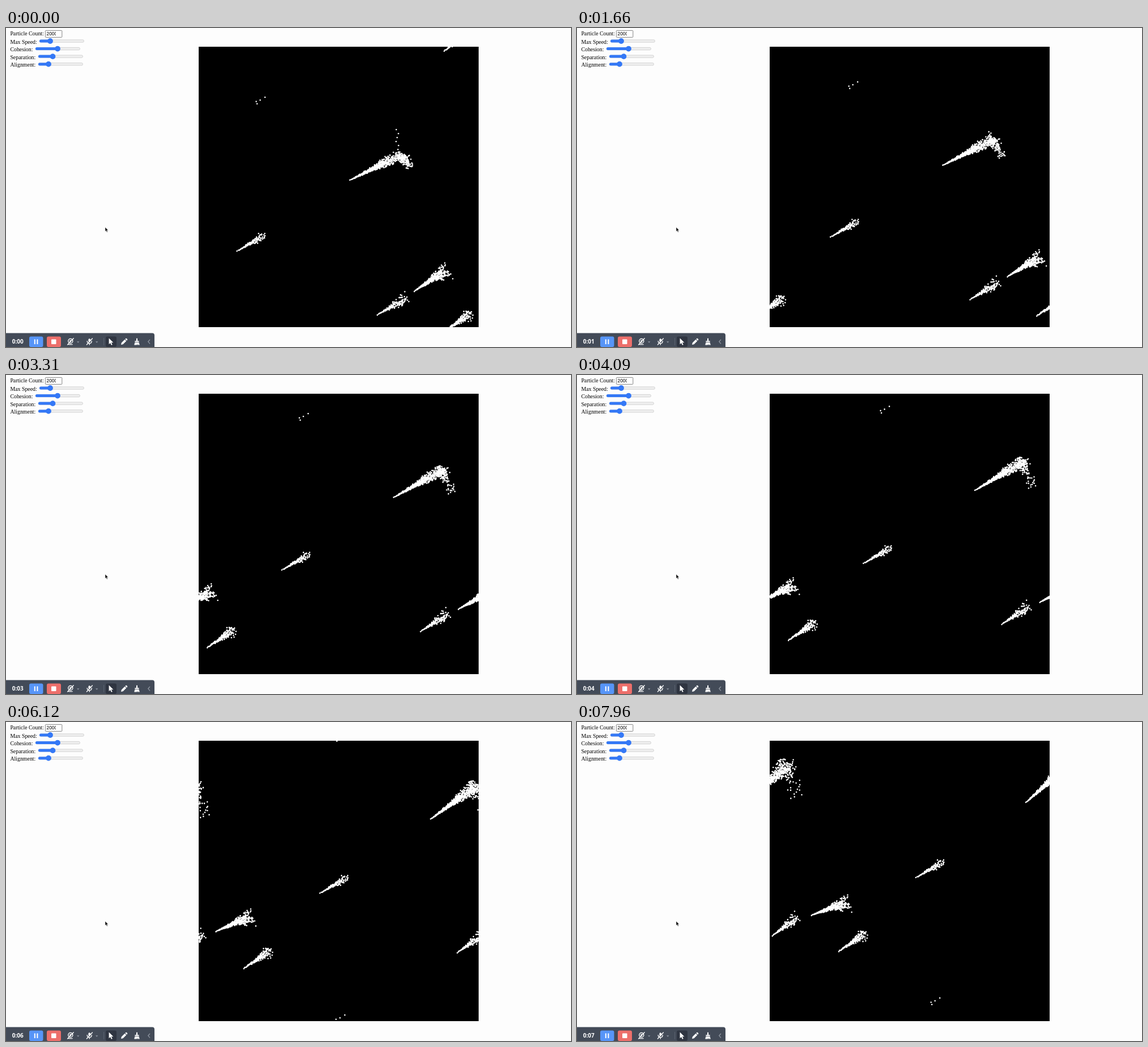
Animation, 997 px wide and 562 px high, one loop 8000 ms. Source, as an HTML page with a canvas:

```html
<!DOCTYPE html>
<html lang="en">
<head>
<meta charset="utf-8">
<title>Flocking particles</title>
<style>
  html, body { margin: 0; width: 100%; height: 100%; overflow: hidden; background: #fdfdfd; }
  canvas { position: absolute; left: 340px; top: 33px; }
  svg { position: absolute; left: 0; top: 0; }
  .label { font: 9.87px "Liberation Serif", serif; }
  .field { font: 8.3px "Liberation Sans", sans-serif; }
  .clock { font: 700 10px "Open Sans", sans-serif; fill: #fff; }
</style>
</head>
<body>
<canvas id="sky" width="494" height="494"></canvas>
<svg width="997" height="562" viewBox="0 0 997 562">
  <defs><clipPath id="fieldClip"><rect x="70" y="4" width="18" height="12"/></clipPath></defs>
  <g id="panel">
    <text class="label" x="7.4" y="13">Particle Count:</text>
    <rect x="69.4" y="4.4" width="29.4" height="12" rx="1" fill="#fff" stroke="#777" stroke-width=".9"/>
    <text class="field" x="71.6" y="13.4" clip-path="url(#fieldClip)">2000</text>
  </g>
  <path d="M175 351v7.5l1.7-1.6 1.3 2.9 1.3-.6-1.3-2.8h2.4z" fill="#111" stroke="#fff" stroke-width=".4"/>

  <path d="M0 537.5h258q4 0 4 4V562H0z" fill="#434b58"/>
  <text class="clock" id="clock" x="10.8" y="556">0:00</text>
  <rect x="41" y="543.5" width="24.5" height="18.5" rx="3" fill="#5795f8"/>
  <path d="M50.8 548.5v8.5M55.4 548.5v8.5" stroke="#fff" stroke-width="2"/>
  <rect x="72" y="543.5" width="25" height="18.5" rx="3" fill="#ed6f6b"/>
  <rect x="80" y="548.5" width="8.5" height="8.5" rx="1" fill="#fff"/>
  <g stroke="#fff" fill="none" stroke-width="1.4" stroke-linecap="round">
    <circle cx="113.8" cy="551.5" r="4"/>
    <circle cx="113.8" cy="551.5" r="1.8" fill="#fff" stroke="none"/>
    <path d="M110.5 557.6h6.6M108.6 558l10.6-11.2"/>
    <rect x="145.4" y="547.2" width="3.6" height="6" rx="1.8" fill="#fff" stroke="none"/>
    <path d="M143.2 551.8q.4 4 4 4t4-4M147.2 556v2M142.4 558l10-11"/>
  </g>
  <path d="M125 552.2h4.4l-2.2 2.6zM158 552.2h4.4l-2.2 2.6z" fill="#8c939e"/>
  <path d="M172.5 546v13" stroke="#59616e"/>
  <rect x="176" y="543.5" width="19" height="18.5" rx="3" fill="#2f3541"/>
  <g fill="#fff">
    <path d="M181.6 546.6v10.6l2.5-2.3 1.8 3.9 1.8-.8-1.8-3.8h3.5z"/>
    <path d="M203 558l.8-3.5 5.8-5.8 2.7 2.7-5.8 5.8zM210.3 548l1-1q.8-.6 1.6.1l1 1q.7.8.1 1.6l-1 1z"/>
    <path d="M230 546.8h2v4.4h2.6v2h-7.2v-2h2.6zM227.4 554h7.2l1.2 4.6h-2.2l-.6-2-.2 2h-1.3l-.3-2-.6 2h-4.4z"/>
  </g>
  <path d="M254 548.8l-3.2 3.8 3.2 3.8" fill="none" stroke="#9299a4" stroke-width="1.3"/>
</svg>
<script>
const LOOP = 8000, SIZE = 494, LEFT = 340, TOP = 33;
const TRAVEL = 225.6; // distance every flock covers in one loop

const sliders = [
  { name: 'Max Speed:', x: 59, thumb: 78 },
  { name: 'Cohesion:', x: 52, thumb: 91 },
  { name: 'Separation:', x: 57, thumb: 82.5 },
  { name: 'Alignment:', x: 57, thumb: 75 },
];
document.getElementById('panel').innerHTML += sliders.map(({ name, x, thumb }, i) => {
  const y = 23 + 13.55 * i;
  return `
  <text class="label" x="7.4" y="${y + 4.6}">${name}</text>
  <rect x="${x}" y="${y - 2.2}" width="78.5" height="4.4" rx="2.2" fill="#efefef" stroke="#bcbcbc" stroke-width=".6"/>
  <rect x="${x}" y="${y - 2.5}" width="${thumb - x}" height="5" rx="2.5" fill="#3478f6"/>
  <circle cx="${thumb}" cy="${y}" r="4.9" fill="#3478f6"/>`;
}).join('');

let seed = 7;
const random = () => (seed = seed * 16807 % 2147483647) / 2147483647;
const bell = () => random() + random() + random() - 1.5;
const repeat = (count, make) => Array.from({ length: count }, (_, i) => make(i, (i + .5) / count));
const wrap = v => ((v % SIZE) + SIZE) % SIZE;

// A dot maps loop progress k (0 to 1) to an offset from its flock's tail.

// Comet shape: a thin tail widening to a loose head, densest in the middle.
function plume({ count, length, width, slope }) {
  return repeat(count, (_, q) => {
    const along = (.5 - Math.sin(Math.asin(1 - 2 * q) / 3)) ** .8;
    const side = bell() * (.8 + width * along ** 2.2);
    return k => {
      const s = slope(k), norm = Math.hypot(1, s), x = length(k) * along;
      return [x - side * s / norm, x * s + side / norm];
    };
  });
}

// Dots trailing down from the head of a plume, most of them drawn back into it over time.
function hook({ count, length, slope }) {
  return repeat(count, (_, q) => {
    const dx = bell(), dy = bell();
    return k => {
      const reach = q ** (1 + 5 * k), spread = 8 + 8 * k * k;
      const droop = 14 + 34 * Math.min(1, 1.5 * k);
      return [length(k) + 20 * reach + dx * spread,
              length(k) * slope(k) + droop * reach ** 2 + dy * spread];
    };
  });
}

// A few dots above the head that fall into it early on.
function stragglers({ length, slope }) {
  return repeat(6, i => {
    const dx = 5 * bell();
    return k => [length(k) + dx, length(k) * slope(k) - (12 + 7 * i) * Math.max(0, 1 - 3.2 * k)];
  });
}

const crest = { count: 430, width: 12, length: k => 88 - 18 * k * k, slope: k => -.5 - .4 * k * k };
const flocks = [
  { x: 457, y: 122, heading: 35.3,
    dots: [[-15.5, 7.5], [-14, 11.5], [-8.5, 5], [0, 0]].map(offset => () => offset) },
  { x: 603, y: 270, heading: 34,
    dots: [...plume(crest), ...hook({ ...crest, count: 190 }), ...stragglers(crest)] },
  { x: 403.5, y: 396, heading: 32,
    dots: plume({ count: 105, length: () => 56, width: 9, slope: () => -.59 }) },
  { x: 717, y: 466, heading: 33.6,
    dots: plume({ count: 300, length: k => 65 + 8 * k, width: 16, slope: k => -.66 + .3 * k }) },
  { x: 651, y: 508, heading: 34.9,
    dots: plume({ count: 130, length: k => 60 - 9 * k, width: 17, slope: k => -.58 - .17 * k }) },
  { x: 770, y: 537, heading: 35.5,
    dots: plume({ count: 185, length: () => 53, width: 12, slope: () => -.7 }) },
];

const ctx = document.getElementById('sky').getContext('2d');
const clock = document.getElementById('clock');

function draw(t) {
  const k = t / LOOP;
  ctx.fillStyle = '#000';
  ctx.fillRect(0, 0, SIZE, SIZE);
  ctx.fillStyle = '#fff';
  ctx.beginPath();
  for (const { x, y, heading, dots } of flocks) {
    const angle = heading * Math.PI / 180;
    const tailX = x - LEFT + TRAVEL * k * Math.cos(angle);
    const tailY = y - TOP - TRAVEL * k * Math.sin(angle);
    for (const dot of dots) {
      const [dx, dy] = dot(k);
      const px = wrap(tailX + dx), py = wrap(tailY + dy);
      ctx.moveTo(px + 1.3, py);
      ctx.arc(px, py, 1.3, 0, 2 * Math.PI);
    }
  }
  ctx.fill();
  clock.textContent = '0:0' + Math.min(7, Math.floor((t + 20) / 1000));
}

const start = performance.now();
function tick() {
  draw((performance.now() - start) % LOOP);
  requestAnimationFrame(tick);
}
tick();
</script>
</body>
</html>
```
